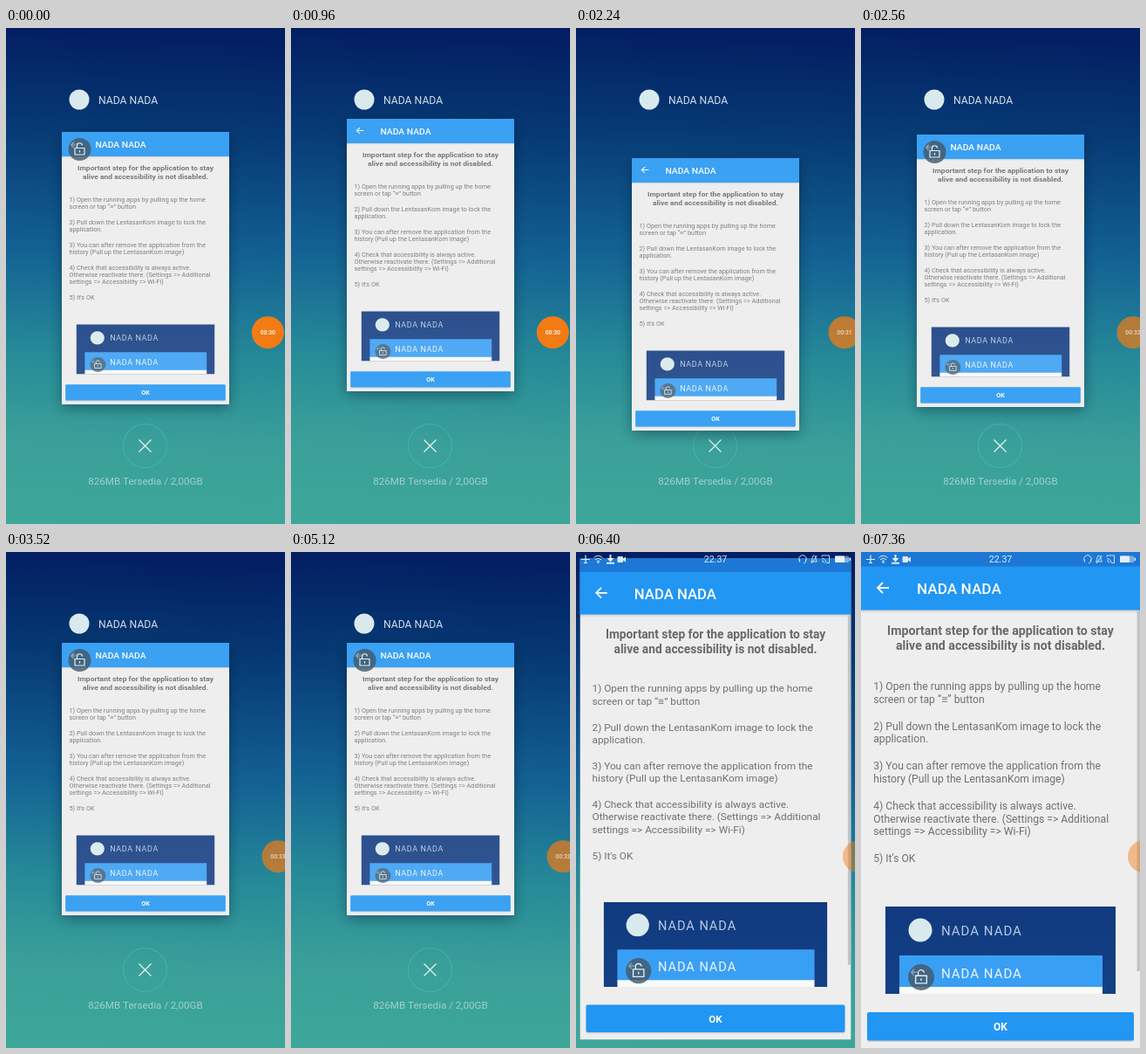
Write an HTML page with a canvas that moves like this. It is 320 by 568 pixels and loops after 7.52 s.

```html
<!DOCTYPE html>
<html lang="id">
<head>
<meta charset="utf-8">
<style>
html, body { margin: 0; width: 100%; height: 100%; overflow: hidden; background: #04215f; }
canvas { display: block; width: 320px; height: 568px; }
</style>
</head>
<body>
<canvas id="stage" width="320" height="568"></canvas>
<script>
const ctx = document.getElementById('stage').getContext('2d');
const LOOP = 7520, STEP = 160, W = 320, H = 568, BAR = 17;
const APP = 'NADA NADA';
const BLUE = '#2196f3';

const HEADING = ['Important step for the application to stay', 'alive and accessibility is not disabled.'];
const STEPS = [
  ['1) Open the running apps by pulling up the home', 'screen or tap “≡” button'],
  ['2) Pull down the LentasanKom image to lock the', 'application.'],
  ['3) You can after remove the application from the', 'history (Pull up the LentasanKom image)'],
  ['4) Check that accessibility is always active.', 'Otherwise reactivate there. (Settings => Additional', 'settings => Accessibility => Wi-Fi)'],
  ["5) It's OK"]
];

// Piecewise linear tracks: [time, value]
const CARD_TOP = [[0, 119], [160, 128], [320, 140], [480, 148], [640, 138], [800, 112], [960, 104],
  [1280, 104], [1440, 108], [1600, 115], [1920, 134], [2080, 143], [2240, 149], [2400, 146], [2560, 122], [2720, 107], [2880, 104]];
const TIMER_X = [[0, 300.3], [2080, 300.3], [2240, 308], [2400, 312], [5120, 312], [5280, 324.5]];
const TIMER_ALPHA = [[0, 1], [2080, 1], [2240, 0.75], [2400, 0.7], [5120, 0.7], [5280, 0.46]];

function track(keys, t) {
  for (let i = 1; i < keys.length; i++) {
    const [t0, a] = keys[i - 1], [t1, b] = keys[i];
    if (t < t1) return a + (b - a) * (t - t0) / (t1 - t0);
  }
  return keys[keys.length - 1][1];
}

function easeInOut(p) {
  return p < 0.5 ? 2 * p * p : 1 - 2 * (1 - p) * (1 - p);
}

function rect(x, y, w, h, fill, r = 0) {
  ctx.fillStyle = fill;
  ctx.beginPath();
  ctx.roundRect(x, y, w, h, r);
  ctx.fill();
}

function disc(x, y, r, fill) {
  ctx.fillStyle = fill;
  ctx.beginPath();
  ctx.arc(x, y, r, 0, 7);
  ctx.fill();
}

function stroke(path, color, width) {
  ctx.strokeStyle = color;
  ctx.lineWidth = width;
  ctx.stroke(new Path2D(path));
}

function verticalGradient(y0, y1, stops, slant = 0) {
  const g = ctx.createLinearGradient(slant, y0, 0, y1);
  stops.forEach(([at, color]) => g.addColorStop(at, color));
  return g;
}

function text(s, x, y, size, color, { weight = 400, align = 'left', spacing = 0 } = {}) {
  ctx.font = `${weight} ${size}px Roboto, sans-serif`;
  ctx.fillStyle = color;
  ctx.textAlign = align;
  ctx.letterSpacing = spacing + 'px';
  ctx.fillText(s, x, y);
}

function lockBadge(x, y, r) {
  ctx.save();
  ctx.translate(x, y);
  ctx.scale(r / 13, r / 13);
  disc(0, 0, 13, 'rgba(68,88,102,0.8)');
  stroke('M-10 -5 h6 M-10 -5 l3 -3 M-10 -5 l3 3', 'rgba(255,255,255,0.4)', 1.2);
  stroke('M-5.5 -1.5 h11 v7.5 h-11 z M-3 -1.5 v-2.5 a3 3 0 0 1 6 -0.5 M0 1 v2.5', '#e6edf0', 1.2);
  ctx.restore();
}

function wallpaper() {
  rect(0, 0, W, H, verticalGradient(0, H, [
    [0, '#031e62'], [0.2, '#063a74'], [0.45, '#136294'],
    [0.65, '#268a98'], [0.82, '#3a9f99'], [1, '#3da799']
  ], 25));
}

function recentsChrome() {
  disc(84, 82, 11.5, '#d9eaee');
  text(APP, 106, 86.5, 12.2, '#c9dbe6');
  ctx.strokeStyle = 'rgba(70,195,180,0.65)';
  ctx.lineWidth = 1;
  ctx.beginPath();
  ctx.arc(159.5, 478.5, 25, 0, 7);
  ctx.stroke();
  stroke('M152.5 471.5 l14 14 m0 -14 l-14 14', '#e6f3f1', 1.2);
  text('826MB Tersedia / 2,00GB', 160, 523, 11.6, 'rgba(185,220,218,0.8)', { align: 'center' });
}

function tutorialPicture() {
  rect(28, 406, 264, 100, verticalGradient(406, 506, [[0, '#113a80'], [1, '#144085']]));
  disc(68, 433, 13.5, '#d9eaee');
  text(APP, 92, 438.5, 15, '#b7c9df', { spacing: 1 });
  rect(44, 462, 233, 37, '#399ff5');
  rect(44, 498, 233, 8, '#fafafa');
  lockBadge(69, 487, 15);
  text(APP, 92, 487.5, 15, '#eef6fd', { spacing: 1 });
}

function appScreen(scrollbar) {
  rect(0, 0, W, H, '#eeeeee');
  rect(0, 66, W, 4, verticalGradient(66, 70, [[0, 'rgba(0,0,0,0.16)'], [1, 'rgba(0,0,0,0)']]));
  rect(0, 0, W, BAR, '#1c78d4');
  rect(0, BAR - 0.5, W, 50, BLUE);
  stroke('M32 41 H19.5 M25 35 l-6 6 l6 6', '#fff', 1.8);
  text(APP, 64, 48, 17.2, '#fff', { weight: 500 });

  HEADING.forEach((s, i) => text(s, 160, 95 + 17 * i, 14.15, '#686868', { weight: 700, align: 'center' }));
  let y = 158;
  for (const lines of STEPS) {
    lines.forEach((s, i) => text(s, 14.2, y + 14.8 * i, 12.17, '#707070'));
    y += 15 * lines.length + 15.6;
  }

  tutorialPicture();
  rect(7, 528, 306, 33, 'rgba(0,0,0,0.12)', 2);
  rect(7, 527, 306, 32.5, BLUE, 2);
  text('OK', 160, 548.3, 12, '#fff', { weight: 700, align: 'center' });
  if (scrollbar) rect(316.5, 67, 3.5, 413, '#c2c4c6');
}

function recentsCard(top, locked) {
  const sx = 0.6, sy = 0.567;
  ctx.save();
  ctx.shadowColor = 'rgba(0,20,40,0.4)';
  ctx.shadowBlur = 16;
  ctx.shadowOffsetY = 4;
  rect(64, top, 192, 312, '#eee', 1);
  ctx.restore();
  ctx.save();
  ctx.beginPath();
  ctx.rect(64, top, 192, 312);
  ctx.clip();
  ctx.translate(64, top - BAR * sy);
  ctx.scale(sx, sy);
  appScreen(false);
  rect(0, 0, W, H, 'rgba(238,238,238,0.12)');
  ctx.restore();
  if (locked) lockBadge(84.5, top + 20, 13);
}

function zoomingScreen(p) {
  const s = 0.6 + 0.4 * p;
  ctx.save();
  ctx.translate(160 * (1 - s), 237 * (1 - s));
  ctx.scale(s, s);
  appScreen(true);
  ctx.restore();
}

function statusBar() {
  const c = 'rgba(242,247,251,0.9)';
  stroke('M6 8.5 h10 M11 3.5 v9 M9 12.5 h4', c, 1.2);
  stroke('M20.5 6.5 q5 -4.5 10 0 M22 8.7 q3.5 -3 7 0 M23.8 10.7 q1.7 -1.4 3.4 0', c, 1);
  disc(25.5, 12, 1, c);
  stroke('M39.5 3 v6 M35 12.8 h9', c, 2);
  ctx.fillStyle = c;
  ctx.fill(new Path2D('M35.5 7 h8 l-4 4.5 z M54 7.5 l3 -2 v6 l-3 -2 z'));
  rect(47.5, 5, 6.5, 7, c, 1);
  text('22.37', 160, 12, 10.6, c, { align: 'center' });
  stroke('M256.5 10.5 a4.3 4.3 0 1 1 7 0 M256.5 8.5 v3 M263.5 8.5 v3 l-2.5 1.5', c, 0.9);
  stroke('M269.5 11 q1.5 -1 1.5 -4 q0 -3 2 -3 q2 0 2 3 q0 3 1.5 4 z M270 13 l6.5 -9', c, 0.9);
  stroke('M282 5.5 v-1.5 h8.5 v8.5 h-3 M282 7.5 a5 5 0 0 1 5 5 M282 10 a2.5 2.5 0 0 1 2.5 2.5', c, 0.9);
  rect(297, 4.5, 16, 7.5, 'rgba(242,247,251,0.45)', 1);
  rect(297, 4.5, 11, 7.5, c, 1);
  rect(313.5, 6.5, 1.5, 3.5, c);
}

function recorder(t) {
  const x = track(TIMER_X, t);
  ctx.save();
  ctx.globalAlpha = track(TIMER_ALPHA, t);
  disc(x, 348.7, 18.5, '#f27b13');
  if (t < 5280) {
    const sec = t < 1280 ? 30 : t < 2400 ? 31 : t < 3520 ? 32 : 33;
    text('00:' + sec, x, 351.3, 6.8, '#fff', { weight: 500, align: 'center' });
  }
  ctx.restore();
}

function draw(t) {
  wallpaper();
  recentsChrome();
  if (t < 5920) {
    recentsCard(track(CARD_TOP, t), t < 560 || t >= 2400);
  } else {
    const p = Math.min(1, Math.max(0, (t - 5980) / 520));
    zoomingScreen(easeInOut(p));
    statusBar();
  }
  recorder(t);
}

const start = performance.now();
function frame() {
  const t = (performance.now() - start) % LOOP;
  draw(Math.floor(t / STEP) * STEP);
  requestAnimationFrame(frame);
}
frame();
</script>
</body>
</html>
```
